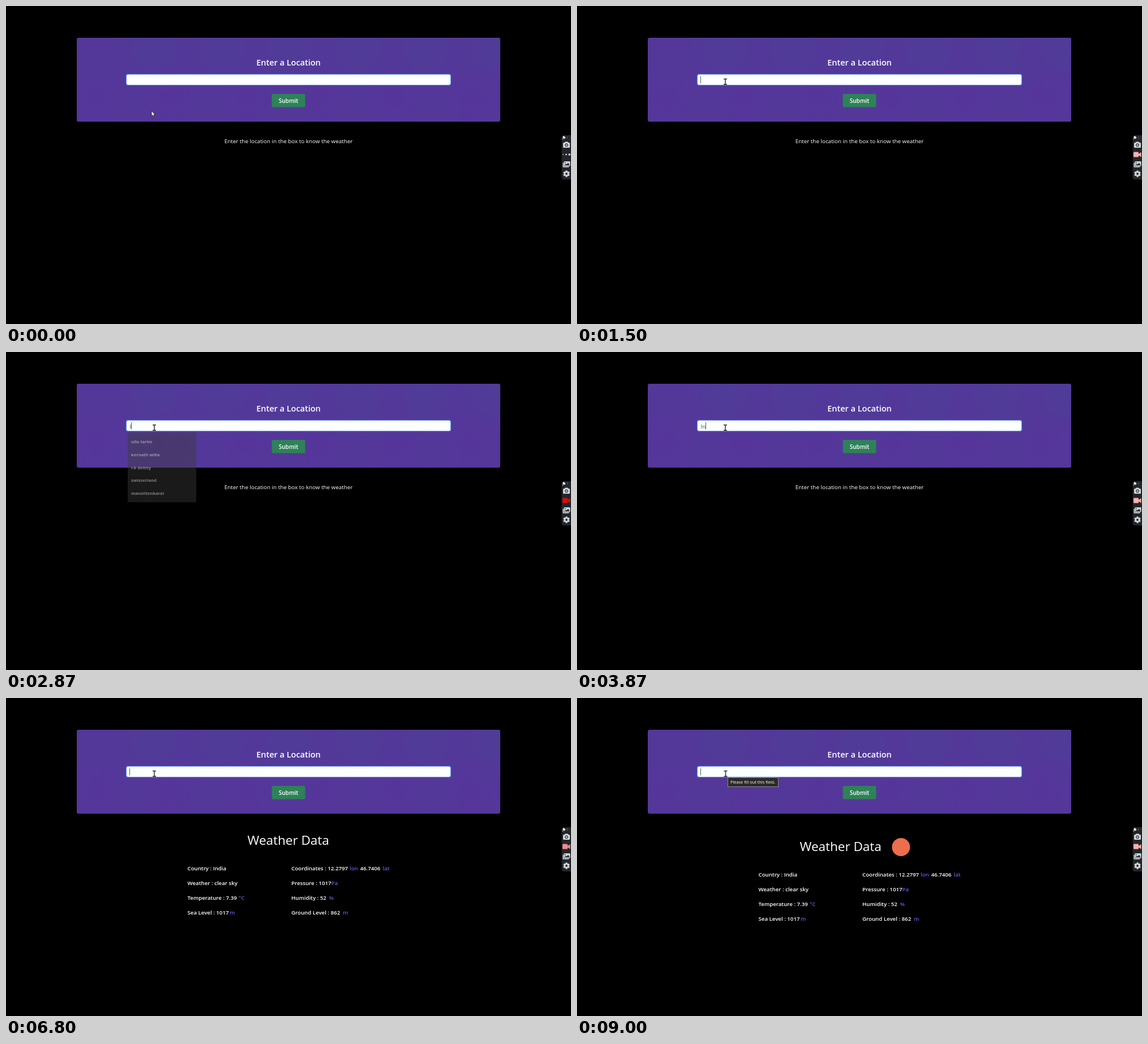
Recreate the animation shown at these times as an HTML page with a canvas. Size 998 by 561 pixels, loop 9.03 s.

```html
<!DOCTYPE html>
<html lang="en">
<head>
<meta charset="utf-8">
<title>Weather lookup</title>
<style>
  html, body { margin: 0; width: 100%; height: 100%; overflow: hidden; background: #000; }
  canvas { display: block; }
</style>
</head>
<body>
<canvas id="stage" width="998" height="561"></canvas>
<script>
const ctx = document.getElementById('stage').getContext('2d');
const LOOP = 9030;
const SANS = '"Open Sans", "Noto Sans", sans-serif';
const UNIT = '#7650e2';

// Moments of the story, in ms
const MOVE_START = 250, MOVE_END = 870, RECORDING = 700;
const MENU_OPEN = 1850, MENU_CLOSE = 2790, MENU_FADE = 170;
const SUBMIT = 5210, RESULT = 6500, ICON_LOADED = 6840, TOOLTIP = 8200;
const TYPED = [[2770, 'I'], [3600, 'In'], [4000, 'Ind'], [4270, 'Indi'], [4600, 'India'], [RESULT, '']];
const CARET_RESETS = [1000, 1700, ...TYPED.map(k => k[0])];

const PLACES = ['ulla tarim', 'kernath willa', 'r.k dolmy', 'swisserland', 'mavolitenkarai'];
const ROWS = [
  [['Country : India', 320.5], ['Coordinates : 12.2797', 504], ['lon', 607, UNIT], ['46.7406', 625.5], ['lat', 665.5, UNIT]],
  [['Weather : clear sky', 320.5], ['Pressure : 1017', 504], ['Pa', 574.5, UNIT]],
  [['Temperature : 7.39', 320.5], ['°C', 411, UNIT], ['Humidity : 52', 504], ['%', 570.5, UNIT]],
  [['Sea Level : 1017', 320.5], ['m', 395, UNIT], ['Ground Level : 862', 504], ['m', 595, UNIT]]
];

const clamp = v => Math.max(0, Math.min(1, v));
const mix = (a, b, k) => a + (b - a) * k;
const smooth = k => k * k * (3 - 2 * k);

function box(x, y, w, h, color, radius = 0) {
  ctx.fillStyle = color;
  ctx.beginPath();
  ctx.roundRect(x, y, w, h, radius);
  ctx.fill();
}

function disc(x, y, r, color) {
  ctx.fillStyle = color;
  ctx.beginPath();
  ctx.arc(x, y, r, 0, 7);
  ctx.fill();
}

function poly(points, fill, stroke) {
  ctx.beginPath();
  points.forEach(([x, y]) => ctx.lineTo(x, y));
  ctx.closePath();
  ctx.fillStyle = fill;
  ctx.fill();
  if (stroke) {
    ctx.strokeStyle = stroke;
    ctx.lineWidth = 0.8;
    ctx.stroke();
  }
}

function text(str, x, y, size, { color = '#fff', weight = 400, align = 'left', family = SANS } = {}) {
  ctx.font = `${weight} ${size}px ${family}`;
  ctx.fillStyle = color;
  ctx.textAlign = align;
  ctx.fillText(str, x, y);
}

function bezierEase(x1, y1, x2, y2) {
  const at = (a, b, s) => 3 * a * s * (1 - s) ** 2 + 3 * b * s * s * (1 - s) + s ** 3;
  return x => {
    let lo = 0, hi = 1;
    for (let i = 0; i < 20; i++) {
      const mid = (lo + hi) / 2;
      if (at(x1, x2, mid) < x) lo = mid; else hi = mid;
    }
    return at(y1, y2, lo);
  };
}
const barEase = bezierEase(0.2, 0.68, 0.18, 1.08);

function glow(x, y, r, rgb) {
  const g = ctx.createRadialGradient(x, y, 0, x, y, r);
  g.addColorStop(0, `rgba(${rgb},.6)`);
  g.addColorStop(1, `rgba(${rgb},0)`);
  ctx.fillStyle = g;
  ctx.fillRect(x - r, y - r, 2 * r, 2 * r);
}

function drawForm(t) {
  ctx.save();
  ctx.beginPath();
  ctx.roundRect(125, 56, 748, 148, 3);
  ctx.clip();
  box(125, 56, 748, 148, '#533899');
  for (let i = 0; i < 6; i++) {
    glow(160 + 132 * i, 162, 60, '88,50,155');
    glow(262 + 120 * i, 74, 60, '76,64,150');
  }
  ctx.restore();

  text('Enter a Location', 499, 105, 14.5, { weight: 600, align: 'center' });
  box(211, 119, 576, 22, 'rgba(30,110,240,.4)', 4);
  box(212.2, 120.2, 573.6, 19.6, '#5f9be8', 3.5);
  box(213, 121, 572, 18, '#fff', 3);
  box(469.5, 155, 59, 23.5, '#2e8158', 2.5);
  text('Submit', 499, 171, 10.1, { weight: 600, align: 'center' });

  const typed = TYPED.filter(k => k[0] <= t).pop();
  const value = typed ? typed[1] : '';
  text(value, 218.5, 134.5, 9.75, { color: '#454a50' });
  const reset = CARET_RESETS.filter(k => k <= t).pop();
  if (reset !== undefined && Math.floor((t - reset) / 530) % 2 === 0) {
    box(218 + Math.round(ctx.measureText(value).width), 124, 1, 12.5, '#555');
  }
}

function drawLoader(t) {
  for (let i = 0; i < 5; i++) {
    const age = (t - SUBMIT) / 1000 - i * 0.1;
    const phase = age < 0 ? 0 : age % 1;
    const scale = phase < 0.5 ? mix(1, 0.4, barEase(phase * 2)) : mix(0.4, 1, barEase(phase * 2 - 1));
    const h = 22.75 * scale;
    box(487.3 + 5.2 * i, 243 - h / 2, 2.6, h, '#fff', 1.3);
  }
}

function drawWeather(t) {
  const loaded = t >= ICON_LOADED;
  const lift = loaded ? 0 : 11;
  text('Weather Data', loaded ? 393.5 : 426.5, 270 - lift, 22.5);
  if (loaded) disc(572.3, 263, 16, '#ec6e4c');
  ROWS.forEach((row, i) => row.forEach(([str, x, color]) =>
    text(str, x, 315 + 26 * i - lift, 9.7, { color, weight: 600 })));
}

function drawMenu(t) {
  const alpha = Math.min(clamp((t - MENU_OPEN) / MENU_FADE), 1 - clamp((t - MENU_CLOSE) / (MENU_FADE - 25)));
  if (alpha <= 0) return;
  ctx.globalAlpha = alpha;
  box(215, 142, 121, 123, '#3b3b3b', 1);
  PLACES.forEach((name, i) =>
    text(name, 221, 161 + 22.75 * i, 7.6, { weight: 600, family: '"Noto Sans", sans-serif' }));
  ctx.globalAlpha = 1;
}

function drawTooltip() {
  box(266, 140, 90, 17, '#8a8a8a');
  box(267, 141, 88, 15, '#2b2b2b');
  text('Please fill out this field.', 271, 151.3, 7.4);
}

function drawRecorder(t) {
  const panel = '#22262b', light = '#d4d7da';
  box(981.5, 228, 20, 78, panel, 4);

  // Pin and grip
  poly([[985, 229], [988.5, 232], [986.5, 234.5], [983, 232]], '#fff');
  box(982.5, 234, 2, 1, '#fff');
  box(991, 230, 1, 4, '#555');

  // Camera
  box(987, 239.5, 6, 3, light, 1);
  box(984, 241, 12, 9, light, 1.5);
  disc(990, 245.3, 2.8, panel);
  disc(990, 245.3, 1.6, light);

  if (t < RECORDING) {
    disc(984.2, 262, 0.8, '#fff');
    disc(989.5, 262, 1.3, '#fff');
    disc(995.2, 262, 1.7, '#fff');
  } else {
    const k = 0.5 + 0.5 * Math.cos((t - 1450) / 2480 * 2 * Math.PI);
    const color = `rgb(${mix(224, 255, k)},${mix(0, 178, k)},${mix(0, 174, k)})`;
    box(983, 257.5, 9, 9, color, 1.3);
    poly([[992, 261], [996.5, 258], [996.5, 266.5], [992, 263.5]], color);
  }

  // Gallery
  box(983.5, 276.5, 11, 8, light, 1);
  box(985, 273.5, 12, 9.5, panel, 1);
  box(985.5, 274, 11, 8.5, light, 1);
  poly([[987, 281], [989, 278], [990.5, 279.5], [993, 276.5], [995.5, 281]], panel);
  disc(988, 276.3, 0.9, panel);

  // Gear
  for (let i = 0; i < 6; i++) {
    ctx.save();
    ctx.translate(990, 296);
    ctx.rotate(i * Math.PI / 3);
    box(-1.7, -5.8, 3.4, 4, light, 0.7);
    ctx.restore();
  }
  disc(990, 296, 4.3, light);
  disc(990, 296, 1.9, panel);
}

function drawPointer(t) {
  const k = smooth(clamp((t - MOVE_START) / (MOVE_END - MOVE_START)));
  const x = mix(257, 262, k) + (t >= 7000 ? 0.5 : 0);
  const y = mix(185, 133.5, k);
  if (y > 140) {
    const shape = [[0, 0], [0, 9.3], [2.1, 7.4], [3.6, 10.6], [5, 10], [3.6, 6.9], [6.4, 6.7]];
    poly(shape.map(([dx, dy]) => [x + dx, y + dy]), '#fff', '#111');
  } else {
    box(x - 3, y - 5.5, 6, 1.4, '#222');
    box(x - 0.7, y - 5.5, 1.4, 11, '#222');
    box(x - 3, y + 4, 6, 1.4, '#222');
  }
}

function draw(t) {
  box(0, 0, 998, 561, '#000');
  drawForm(t);
  if (t < SUBMIT) text('Enter the location in the box to know the weather', 499, 242, 9.85, { align: 'center' });
  else if (t < RESULT) drawLoader(t);
  else drawWeather(t);
  drawMenu(t);
  if (t >= TOOLTIP) drawTooltip();
  drawRecorder(t);
  drawPointer(t);
}

const start = performance.now();
function tick() {
  draw((performance.now() - start) % LOOP);
  requestAnimationFrame(tick);
}
tick();
</script>
</body>
</html>
```
